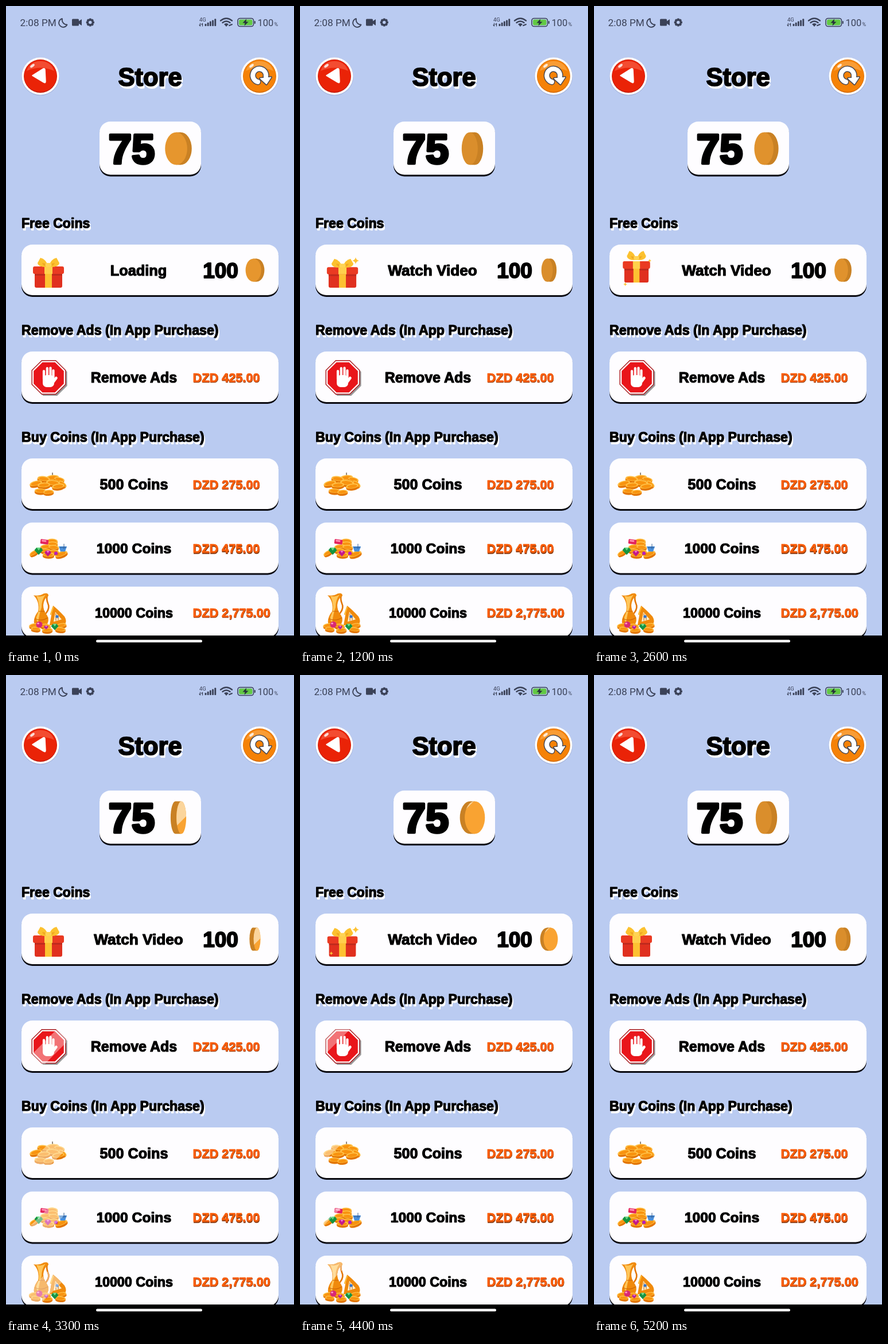
An HTML page that plays this animation: 502 by 1115 pixels, repeating every 5.3 s.

```html
<!DOCTYPE html>
<html lang="en">
<head>
<meta charset="utf-8">
<title>Store</title>
<style>
html, body { margin: 0; width: 100%; height: 100%; overflow: hidden; background: #bacbf1; }
svg { display: block; width: 502px; height: 1115px; }
text { font-family: "Liberation Sans", Arial, sans-serif; font-weight: 700; stroke-linejoin: round; }
.bar { font-family: Roboto, sans-serif; font-weight: 400; fill: #3b4258; }
</style>
</head>
<body>
<svg id="stage" viewBox="0 0 502 1115" xmlns="http://www.w3.org/2000/svg"></svg>
<script>
const LOOP = 5300, STEP = 100, SPIN = 4000 / 3, GIFT = 1630, LOADED = 600;
const stage = document.getElementById('stage');

// Static building blocks
const rect = (x, y, w, h, r, fill, more = '') =>
  `<rect x="${x}" y="${y}" width="${w}" height="${h}" rx="${r}" fill="${fill}" ${more}/>`;
const oval = (x, y, rx, ry, fill, more = '') =>
  `<ellipse cx="${x}" cy="${y}" rx="${rx}" ry="${ry}" fill="${fill}" ${more}/>`;
const path = (d, fill, more = '') => `<path d="${d}" fill="${fill}" ${more}/>`;
const line = (d, color, width) =>
  path(d, 'none', `stroke="${color}" stroke-width="${width}" stroke-linecap="round" stroke-linejoin="round"`);
const label = (s, x, y, size, { color = '#000', anchor = 'middle', weight = 1.2, id = '' } = {}) =>
  `<text ${id && `id="${id}"`} x="${x}" y="${y}" font-size="${size}" text-anchor="${anchor}" ` +
  `fill="${color}" stroke="${color}" stroke-width="${weight}">${s}</text>`;
const heading = (s, x, y, size, anchor, weight) =>
  label(s, x + 2, y + 4, size, { color: '#fff', anchor, weight }) + label(s, x, y, size, { anchor, weight });
const price = (s, y) =>
  label(s, 326, y + 1.5, 21.7, { color: '#8a3a10', anchor: 'start', weight: .7 }) +
  label(s, 325.5, y, 21.7, { color: '#fa5e08', anchor: 'start', weight: .7 });
const card = (x, y, w, h) =>
  rect(x, y + 3, w, h, 19, '#0a0a10') + rect(x, y, w, h, 19, '#fefdff');

function statusBar() {
  const small = (s, x, y, size) => `<text class="bar" x="${x}" y="${y}" font-size="${size}">${s}</text>`;
  const ink = '#3b4258';
  let teeth = '';
  for (let i = 0; i < 8; i++) teeth += rect(144.8, 21.4, 4, 4, 1, ink, `transform="rotate(${i * 45} 146.8 28.5)"`);
  let bars = '';
  for (let i = 0; i < 5; i++) bars += rect(346.5 + i * 4.2, 31 - i * 2.2, 2.9, 4 + i * 2.2, 1, ink);
  return small('2:08 PM', 24.5, 34.5, 17.2) +
    path('M98 22A7.5 7.5 0 1 0 106.5 32.5A8.5 8.5 0 0 1 98 22Z', 'none', `stroke="${ink}" stroke-width="1.8" stroke-linejoin="round"`) +
    rect(115, 22.5, 12, 12, 1.5, ink) + path('M126 27L132 23V34L126 30Z', ink) +
    teeth + oval(146.8, 28.5, 4.3, 4.3, 'none', `stroke="${ink}" stroke-width="3"`) +
    small('4G', 337, 27, 9.5) +
    line('M338.5 30V34.5M337 33L338.5 34.8M342.5 35V30.5M341 32L342.5 30.3', ink, 1.2) + bars +
    line('M374 25.5Q384 17.5 394 25.5M377.5 29Q384 24 390.5 29', ink, 2.4) +
    path('M380 31.5Q384 28.5 388 31.5L384 36Z', ink) +
    line('M389 34L394 32', ink, 2) +
    rect(404, 21.5, 27.5, 14, 4, 'none', `stroke="${ink}" stroke-width="1.6"`) +
    rect(406, 23.5, 23.5, 10, 2.5, '#62c944') + rect(432.8, 26, 2, 5, 1, ink) +
    path('M419 22.5L412.5 29.5H416.5L415.5 34.5L422.5 27.5H418.5Z', '#26303c') +
    small('100', 438.5, 35, 16.5) + small('%', 467.5, 35, 9);
}

function roundButton(x, main, dark, light) {
  return oval(x, 123, 33, 33, '#8f9cc0', 'opacity=".4"') + oval(x, 122, 32.5, 32.5, '#fff') +
    oval(x, 122, 29, 29, dark) + oval(x, 121.5, 28.5, 28, main) +
    path(`M${x - 24} 113Q${x - 18} 96 ${x} 96Q${x + 18} 96 ${x + 24} 113Q${x} 102 ${x - 24} 113Z`, light, 'opacity=".4"') +
    oval(x - 14, 104, 4.5, 2.2, '#fff', `opacity=".8" transform="rotate(-38 ${x - 14} 104)"`);
}

function flatCoin(x, y, tilt = 0, rx = 11) {
  const ry = rx * .38;
  return `<g transform="translate(${x} ${y}) rotate(${tilt})">` +
    oval(0, 3.6, rx, ry, '#e27503') + rect(-rx, 0, 2 * rx, 3.6, 0, '#f08a0c') +
    oval(0, 0, rx, ry, '#ffc24a') + oval(0, .4, rx * .8, ry * .72, '#f8930f') + '</g>';
}
const coins = list => list.map(c => flatCoin(...c)).join('');
const gem = (x, y, r, color, pale) =>
  path(`M${x - r} ${y - r * .2}L${x - r * .5} ${y - r * .8}H${x + r * .5}L${x + r} ${y - r * .2}L${x} ${y + r * .9}Z`, color) +
  path(`M${x - r * .5} ${y - r * .8}H${x + r * .5}L${x} ${y - r * .1}Z`, pale);

function stopSign() {
  const octagon = r => Array.from({ length: 8 }, (_, i) => {
    const a = (i + .5) * Math.PI / 4;
    return `${(74.5 + r * Math.cos(a)).toFixed(1)},${(646 + r * Math.sin(a)).toFixed(1)}`;
  }).join(' ');
  const poly = (r, fill, more = '') => `<polygon points="${octagon(r)}" fill="${fill}" ${more}/>`;
  return poly(32, '#777', 'transform="translate(2.5 2.5)" opacity=".75"') + poly(32.5, '#a5161a') +
    poly(31, '#fff') + poly(28.5, '#e9161b') +
    rect(64, 642, 20, 21, 7, '#fff') +
    line('M66 649V635M71.8 648V630M77.5 648V629.5M82.5 650V634', '#fff', 4.2) +
    line('M80 657L87.5 647', '#fff', 4.6);
}

function coinPile() {
  return line('M81 812V820', '#4b3a25', 1.2) +
    coins([[81, 820, -6], [66, 822, 8], [93, 823, 12, 9], [52, 830, -14], [99, 831, 38, 8],
      [82, 829, 5, 12], [66, 833, -4], [91, 835, -8], [60, 843, 3, 10], [74, 845, -5, 9]]);
}

function gemPile() {
  return coins([[81, 930, 4, 9], [81, 935, 0, 9], [69, 940, -5, 9], [83, 941, 3, 9],
      [48, 951, -30, 8], [69, 947, 4, 9], [96, 953, -20], [83, 949, 0, 9], [74, 954, 2, 10]]) +
    rect(60, 928, 14, 8, 1.5, '#e3245c', 'transform="rotate(8 67 932)"') +
    rect(62, 929, 8, 3, 1, '#ff8eb1', 'transform="rotate(8 67 932)"') +
    gem(57, 948, 7.5, '#14933f', '#66d982') + gem(73, 952, 6, '#c2188a', '#f17ac8') +
    path('M92 940H106L103 949H95Z', '#4a90dc') + line('M101 936V944M94 942H105', '#335c91', 1) +
    oval(87, 952, 3, 3, '#b41fbd');
}

function treasure() {
  return line('M72 1025Q70 1032 73 1039Q77 1047 70 1056', '#e27503', 2.6) +
    path('M48 1025Q58 1027 66 1022Q74 1020 74 1026Q66 1031 65 1042Q65 1050 69 1056Q77 1066 72 1075Q66 1083 57 1081Q47 1077 49 1067Q51 1059 56 1053Q59 1036 48 1025Z', '#f08a0c') +
    path('M53 1026Q62 1029 69 1024Q62 1033 62 1046Q58 1057 56 1072Q50 1067 55 1058Q61 1043 53 1026Z', '#ffc65a') +
    line('M57 1053H67M51 1066Q62 1071 73 1064', '#cf6504', 1.2) +
    path('M82 1043Q91 1050 102 1062Q107 1070 102 1077L76 1077Q79 1060 82 1043Z', '#f08a0c') +
    path('M86 1054L97 1067L83 1071Z', '#fff0cc') + line('M87 1057V1069M91 1061V1068', '#b85b0d', 1) +
    line('M82 1046L78 1058', '#ffbc37', 2.4) + oval(89, 1062, 2.6, 2.6, '#3577cf') +
    coins([[48, 1077, -12, 8], [69, 1078, 5, 9], [96, 1077, -12, 9], [52, 1083, 4, 8], [72, 1085, -3, 9], [95, 1084, 5, 9]]) +
    gem(85, 1080, 6.5, '#169344', '#75dd8e') + oval(58, 1076, 5.5, 5.5, '#d92873') +
    oval(56, 1074, 2, 1.6, '#ff9ac4') + gem(70, 1081, 4, '#b51f9f', '#f08fe0');
}

function gift() {
  const star = id => path('M0-6Q.8-.8 6 0Q.8.8 0 6Q-.8.8-6 0Q-.8-.8 0-6Z', '#fdc235', `id="${id}"`);
  return '<g id="box">' +
    rect(50, 462, 48, 28, 3, '#e0301f') + rect(50, 465, 48, 4, 0, '#c02a1d') +
    rect(68, 462, 12, 28, 0, '#fdc132') + rect(47, 453, 54, 13, 3, '#ea3a22') +
    rect(67, 453, 14, 13, 0, '#ffd04c') + '</g><g id="bow">' +
    path('M74 454Q56 455 55 447L60 438Q70 440 74 454Z', '#fcc12f') +
    path('M74 454Q92 455 93 447L88 438Q78 440 74 454Z', '#fcc12f') +
    path('M72 453Q64 452 63 447Q70 447 74 453ZM76 453Q84 452 85 447Q78 447 74 453Z', '#f0a922') +
    rect(68.5, 447, 11, 7, 3, '#ffd454') + '</g>' + star('star0') + star('star1') + star('star2');
}

const spinner = id => `<g id="${id}"><ellipse/><rect/><ellipse/><ellipse fill="#fbd59c" clip-path="url(#${id}Clip)"/></g>`;

// Each sheen sweeps diagonally across its own square
const sheens = [
  { id: 'stop', x: 75, y: 646, r: 31, art: stopSign },
  { id: 'pile', x: 74, y: 832, r: 32, art: coinPile },
  { id: 'gems', x: 74, y: 943, r: 32, art: gemPile },
  { id: 'loot', x: 73, y: 1055, r: 34, art: treasure },
];
const spinners = [
  { id: 'bigCoin', x: 300.5, y: 248, r: 28.3 },
  { id: 'smallCoin', x: 434, y: 459.5, r: 20 },
];
const clip = s => `<clipPath id="${s.id}Clip" clipPathUnits="userSpaceOnUse"><polygon/></clipPath>`;
const shiny = s => `<g id="${s.id}">${s.art()}</g>` +
  `<g clip-path="url(#${s.id}Clip)"><use href="#${s.id}" filter="url(#pale)"/></g>`;

stage.innerHTML =
  `<defs><filter id="pale" color-interpolation-filters="sRGB"><feColorMatrix values=
   ".6 0 0 0 .4  0 .6 0 0 .4  0 0 .6 0 .4  0 0 0 1 0"/></filter>${[...sheens, ...spinners].map(clip).join('')}</defs>` +
  rect(0, 0, 502, 1115, 0, '#bacbf1') + statusBar() +
  roundButton(60, '#ea2307', '#c41b08', '#ff8a70') +
  path('M46 121L65 109Q68 108 68 111L69 131Q69 135 66 133Z', '#fff', 'stroke="#fff" stroke-width="1.5" stroke-linejoin="round"') +
  roundButton(442, '#f58207', '#d56a04', '#ffc27a') +
  [['#4c4a52', 11, 3], ['#fff', 8, 0]].map(([c, w, edge]) =>
    line('M439 132A11.5 11.5 0 1 1 453 123', c, w) +
    path('M443 126L462 124L454 136Z', c, `stroke="${c}" stroke-width="${edge + 1}" stroke-linejoin="round"`)).join('') +
  heading('Store', 251, 139, 43.5, 'middle', 2) +
  card(163, 201, 177, 92.5) + label('75', 219, 274, 72.5, { weight: 4.5 }) + spinner('bigCoin') +
  heading('Free Coins', 27, 386, 23.1, 'start', 1.2) +
  heading('Remove Ads (In App Purchase)', 27, 572, 23.2, 'start', 1.2) +
  heading('Buy Coins (In App Purchase)', 27, 758, 23.2, 'start', 1.2) +
  [415, 601, 787, 898.5, 1010].map(y => card(27, y, 448, 88)).join('') +
  gift() + label('Loading', 231, 468.5, 25.4, { id: 'offer' }) +
  label('100', 374, 473, 37, { weight: 2 }) + spinner('smallCoin') +
  label('Remove Ads', 223, 654.5, 25) + price('DZD 425.00', 653.5) +
  label('500 Coins', 223, 840.5, 25.2) + price('DZD 275.00', 839.5) +
  label('1000 Coins', 223, 952, 24.7) + price('DZD 475.00', 951) +
  label('10000 Coins', 223, 1063.5, 23.3) + price('DZD 2,775.00', 1062.5) +
  sheens.map(shiny).join('') +
  rect(0, 1095, 502, 20, 0, '#000') + rect(157, 1102.5, 185, 4.5, 2.2, '#fff');

// Motion
const byId = id => document.getElementById(id);
const set = (el, attrs) => { for (const k in attrs) el.setAttribute(k, attrs[k]); };
const clamp = v => Math.max(0, Math.min(1, v));
const mix = (a, b, k) => a + (b - a) * k;

// Rows are [time, ...values]
function sample(rows, t) {
  const i = Math.max(1, rows.findIndex(r => r[0] >= t));
  const a = rows[i - 1], b = rows[i], k = clamp((t - a[0]) / (b[0] - a[0]));
  return a.slice(1).map((v, j) => mix(v, b[j + 1], k));
}

const TURN = [[0, -.82], [400, .9], [667, 1.32], [1200, 2.09], [1334, 2.32]];
// time, lift, scale x, scale y, extra bow lift
const HOP = [[0, 0, 1, 1, 0], [680, 0, 1, 1, 0], [820, 0, 1.06, .9, 0], [970, -9, .88, 1, -3],
  [1130, 0, .97, .96, 0], [1210, 0, 1.01, .97, 0], [1320, 0, 1, 1, 0], [1630, 0, 1, 1, 0]];
// time, size of each star
const TWINKLE = [[0, 0, 0, 0], [840, 0, 0, 0], [970, .5, .55, 0], [1140, 1, .6, .4], [1200, 1, 0, .45], [1350, 0, 0, 0], [1630, 0, 0, 0]];
const STARS = [[97, 443], [54.5, 484], [90, 449]];

function band(s, lead, trail) {
  const h = Math.SQRT1_2 * s.r;
  const at = (u, v) => `${s.x + (u + v) * h},${s.y + (u - v) * h}`;
  byId(s.id + 'Clip').firstChild.setAttribute('points',
    [at(lead, -2), at(lead, 2), at(trail, 2), at(trail, -2)].join(' '));
}

function spin(s, angle) {
  const [back, side, face, shine] = byId(s.id).children;
  const rx = s.r * Math.cos(angle), off = s.r * .19 * Math.sin(angle);
  const k = clamp((angle + 1.15) / .7);
  const tone = [[213, 249], [138, 163], [43, 50]].map(([a, b]) => Math.round(mix(a, b, k)));
  const disc = { cy: s.y, rx, ry: s.r };
  set(back, { ...disc, cx: s.x - off, fill: '#c98124' });
  set(side, { x: s.x - Math.abs(off), y: s.y - s.r, width: 2 * Math.abs(off), height: 2 * s.r, fill: '#c98124' });
  set(face, { ...disc, cx: s.x + off, fill: `rgb(${tone})` });
  set(shine, { ...disc, cx: s.x + off, visibility: angle > 0 ? 'visible' : 'hidden' });
}

function draw(t) {
  const p = t % SPIN, g = t % GIFT;
  let [angle] = sample(TURN, p);
  if (angle > Math.PI / 2) angle -= Math.PI;
  const sweep = (p - 400) * .004;
  for (const s of spinners) {
    spin(s, angle);
    band(s, sweep - .65, sweep - 2.1);
  }
  for (const s of sheens) band(s, sweep - .4, sweep - 1.3);
  const [lift, sx, sy, bow] = sample(HOP, g);
  const pose = dy => `translate(74 ${490 + dy}) scale(${sx} ${sy}) translate(-74 -490)`;
  byId('box').setAttribute('transform', pose(lift));
  byId('bow').setAttribute('transform', pose(lift + bow));
  sample(TWINKLE, g).forEach((size, i) =>
    byId('star' + i).setAttribute('transform', `translate(${STARS[i]}) scale(${size})`));
  byId('offer').textContent = t < LOADED ? 'Loading' : 'Watch Video';
  byId('offer').setAttribute('font-size', t < LOADED ? 25.4 : 26.2);
}

const start = performance.now();
function frame() {
  const t = (performance.now() - start) % LOOP;
  draw(Math.floor(t / STEP) * STEP);
  requestAnimationFrame(frame);
}
frame();
</script>
</body>
</html>
```
